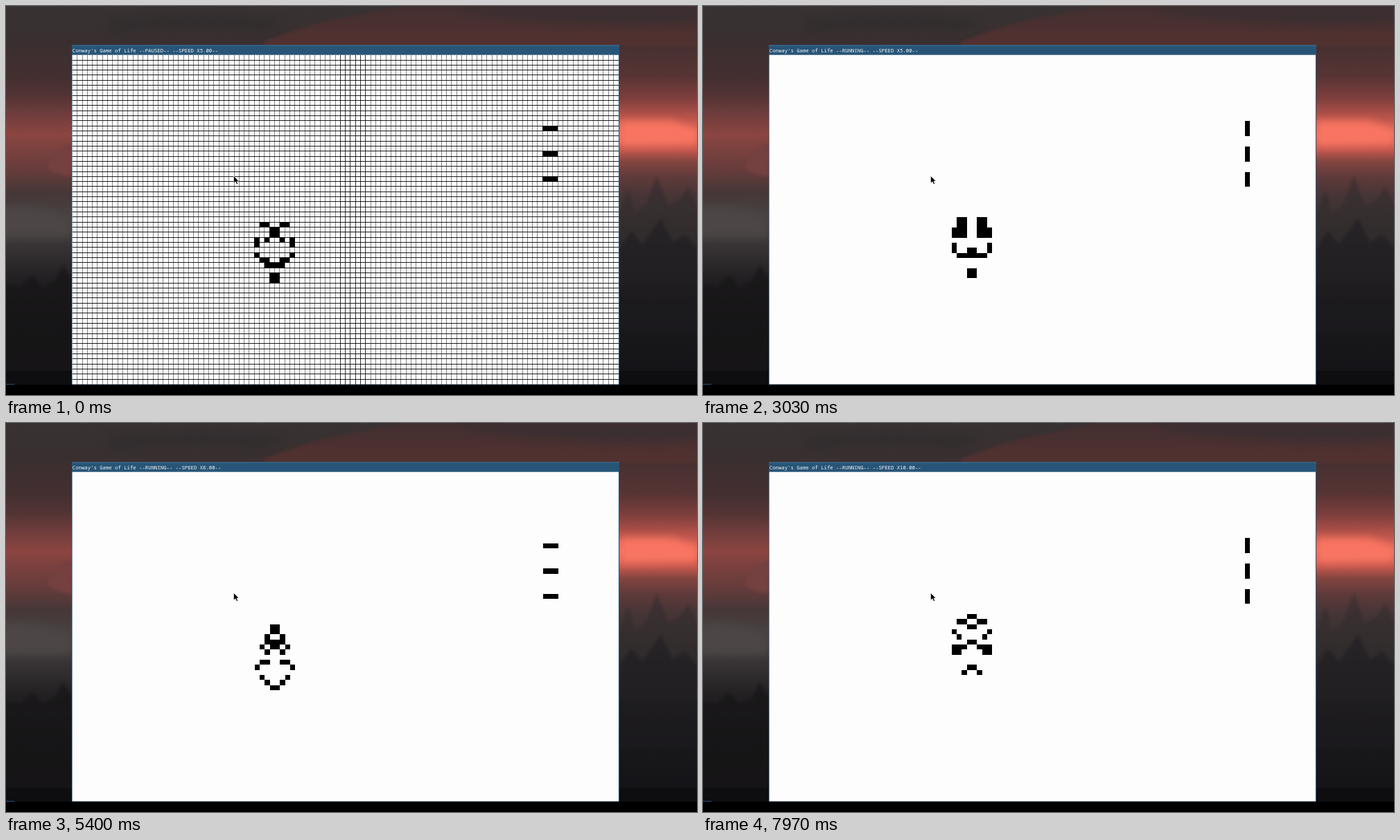
An HTML page that plays this animation: 997 px wide and 562 px high, repeating every 8000 ms.

```html
<!DOCTYPE html>
<html lang="en">
<head>
<meta charset="utf-8">
<title>Game of Life</title>
<style>
  html, body { margin: 0; width: 100%; height: 100%; overflow: hidden; background: #000; }
  svg { display: block; width: 100vw; height: 100vh; }
  text { font: 7.3px "Noto Sans Mono", "DejaVu Sans Mono", monospace; fill: #f2f6f8; white-space: pre; }
</style>
</head>
<body>
<svg viewBox="0 0 997 562" xmlns="http://www.w3.org/2000/svg">
  <defs>
    <linearGradient id="west" x2="0" y2="1">
      <stop offset="0" stop-color="#383233"/>
      <stop offset=".08" stop-color="#382f30"/>
      <stop offset=".18" stop-color="#432f30"/>
      <stop offset=".23" stop-color="#523334"/>
      <stop offset=".28" stop-color="#703d3c"/>
      <stop offset=".33" stop-color="#8b4540"/>
      <stop offset=".37" stop-color="#7a413e"/>
      <stop offset=".43" stop-color="#623b3b"/>
      <stop offset=".48" stop-color="#463737"/>
      <stop offset=".54" stop-color="#484242"/>
      <stop offset=".62" stop-color="#373334"/>
      <stop offset=".7" stop-color="#222022"/>
      <stop offset=".82" stop-color="#171618"/>
      <stop offset="1" stop-color="#111013"/>
    </linearGradient>
    <linearGradient id="east" x2="0" y2="1">
      <stop offset="0" stop-color="#3d3032"/>
      <stop offset=".1" stop-color="#463031"/>
      <stop offset=".18" stop-color="#573434"/>
      <stop offset=".24" stop-color="#803f3d"/>
      <stop offset=".29" stop-color="#bd564c"/>
      <stop offset=".33" stop-color="#e6695b"/>
      <stop offset=".37" stop-color="#c4584d"/>
      <stop offset=".4" stop-color="#82443f"/>
      <stop offset=".44" stop-color="#5f3a3a"/>
      <stop offset=".49" stop-color="#463536"/>
      <stop offset=".56" stop-color="#393130"/>
      <stop offset=".64" stop-color="#2b282a"/>
      <stop offset=".76" stop-color="#1b1a1d"/>
      <stop offset="1" stop-color="#121115"/>
    </linearGradient>
    <linearGradient id="hill" x2="0" y2="1">
      <stop offset="0" stop-color="#432f30"/>
      <stop offset="1" stop-color="#533230"/>
    </linearGradient>
    <filter id="soft" x="-50%" y="-50%" width="200%" height="200%" color-interpolation-filters="sRGB">
      <feGaussianBlur stdDeviation="6"/>
    </filter>
    <filter id="haze" x="-20%" y="-20%" width="140%" height="140%" color-interpolation-filters="sRGB">
      <feGaussianBlur stdDeviation="2"/>
    </filter>
  </defs>

  <g id="wallpaper">
    <rect width="640" height="562" fill="url(#west)"/>
    <rect x="640" width="357" height="562" fill="url(#east)"/>
    <path d="M372 52Q430 28 480 18T575 0H997V58H372Z" fill="url(#hill)" filter="url(#haze)"/>
    <g filter="url(#soft)">
      <path d="M150 20Q270 8 400 20L370 36Q260 26 150 38Z" fill="#322d2e"/>
      <path d="M660 0H997V24Q820 34 660 8Z" fill="#3b2f31"/>
      <path d="M885 166H960L997 178V200L885 202Z" fill="#f87561"/>
      <path d="M-10 292Q40 282 95 308V335H-10Z" fill="#4c4646"/>
    </g>
    <path d="M95 196Q70 210 59 234Q75 246 95 246Z" fill="#744040" filter="url(#haze)"/>
    <g filter="url(#haze)">
      <path d="M885 300L898 265L908 300L925 285L939 245L955 290L972 280L985 262L997 290V400H885Z" fill="#2f2b2c" opacity=".5"/>
      <path d="M885 350L902 325L918 345L945 306L962 342L980 330L997 350V470H885Z" fill="#1e1c1f" opacity=".55"/>
      <path d="M0 402L20 405L38 390L52 405L70 398L82 375L95 395V547H0Z" fill="#171618" opacity=".7"/>
    </g>
    <rect y="527" width="997" height="20" fill="#0e0d10"/>
    <rect y="547" width="997" height="15" fill="#000"/>
    <rect y="546" width="12" height="1" fill="#285577"/>
  </g>

  <rect x="94.9" y="56.5" width="790" height="490.5" fill="#285577"/>
  <rect x="95" y="56.5" width="790" height="1" fill="#3f7596"/>
  <rect x="95.6" y="70.7" width="788.3" height="475.8" fill="#fdfdfd"/>
  <text id="title" x="95.8" y="66.6"></text>
  <path id="cells" shape-rendering="crispEdges"/>
  <g id="grid" fill="none" stroke="#000" shape-rendering="crispEdges">
    <path id="rows" stroke-opacity=".88"/>
    <path id="cols" stroke-opacity=".48"/>
    <path id="dark" stroke-opacity=".8"/>
  </g>
  <path d="M328.5 245.5V256L331 253.8L332.8 257.6L334.6 256.8L332.9 253.1H336Z" stroke="#fff" stroke-width=".6"/>
</svg>
<script>
const LOOP = 8000, COLS = 108, ROWS = 65;
// a 10 px cell of a 1366 x 768 screen, scaled to the stage
const W = 9970 / 1366, H = 5620 / 768;
const LEFT = 95.5, TOP = 70.7;
// [start time in ms, speed factor]
const SPEEDS = [[1030, 5], [3800, 6], [4950, 7], [5250, 8], [5500, 9], [5750, 10]];
const COPPERHEAD = [
  ".OO..OO.", "...OO...", "...OO...", "O.O..O.O", "O......O", "........",
  "O......O", ".OO..OO.", "..OOOO..", "........", "...OO...", "...OO..."
];
const $ = id => document.getElementById(id);

function stamp(world, lines, col, row) {
  lines.forEach((line, y) => [...line].forEach((ch, x) => {
    if (ch === "O") world[(row + y) * COLS + col + x] = 1;
  }));
}

function step(world) {
  const next = new Uint8Array(world.length);
  for (let y = 1; y < ROWS - 1; y++) {
    for (let x = 1; x < COLS - 1; x++) {
      const i = y * COLS + x;
      let sum = 0;
      for (let dy = -COLS; dy <= COLS; dy += COLS) {
        sum += world[i + dy - 1] + world[i + dy] + world[i + dy + 1];
      }
      next[i] = sum === 3 || (sum === 4 && world[i]) ? 1 : 0;
    }
  }
  return next;
}

function outline(world) {
  let d = "";
  world.forEach((alive, i) => {
    if (!alive) return;
    const x = LEFT + i % COLS * W, y = TOP + Math.floor(i / COLS) * H;
    d += `M${x.toFixed(2)} ${y.toFixed(2)}h${W}v${H}h${-W}z`;
  });
  return d;
}

function clock(t) {
  let gen = 0, speed = SPEEDS[0][1];
  SPEEDS.forEach(([start, factor], i) => {
    if (t < start) return;
    const end = i + 1 < SPEEDS.length ? SPEEDS[i + 1][0] : LOOP;
    gen += (Math.min(t, end) - start) / (1000 / factor + 10);
    speed = factor;
  });
  return { gen: Math.floor(gen), speed, paused: t < SPEEDS[0][0] };
}

function drawGrid() {
  let rows = "", cols = "", dark = "";
  for (let r = 1; r < ROWS; r++) rows += `M95.6 ${(TOP + r * H).toFixed(2)}H884`;
  for (let c = 1; c < COLS; c++) {
    const x = LEFT + c * W, line = `M${x.toFixed(2)} 70.7V546.5`;
    if (x > 478 && x < 524) dark += line; else cols += line;
  }
  $("rows").setAttribute("d", rows);
  $("cols").setAttribute("d", cols);
  $("dark").setAttribute("d", dark);
}

let world = new Uint8Array(COLS * ROWS);
stamp(world, COPPERHEAD, 36, 33);
[14, 19, 24].forEach(row => stamp(world, ["OOO"], 93, row));
const shapes = [];
for (let i = 0; i <= clock(LOOP).gen; i++) {
  shapes.push(outline(world));
  world = step(world);
}
drawGrid();

let shown = "";
function render(t) {
  const { gen, speed, paused } = clock(t);
  const key = [gen, speed, paused].join();
  if (key === shown) return;
  shown = key;
  $("title").textContent =
    `Conway's Game of Life --${paused ? "PAUSED" : "RUNNING"}-- --SPEED X${speed.toFixed(2)}--`;
  $("grid").style.display = paused ? "" : "none";
  $("cells").setAttribute("transform", paused ? "" : "translate(.5 .5)");
  $("cells").setAttribute("d", shapes[gen]);
}

const begin = performance.now();
function frame() {
  render((performance.now() - begin) % LOOP);
  requestAnimationFrame(frame);
}
render(0);
requestAnimationFrame(frame);
</script>
</body>
</html>
```
